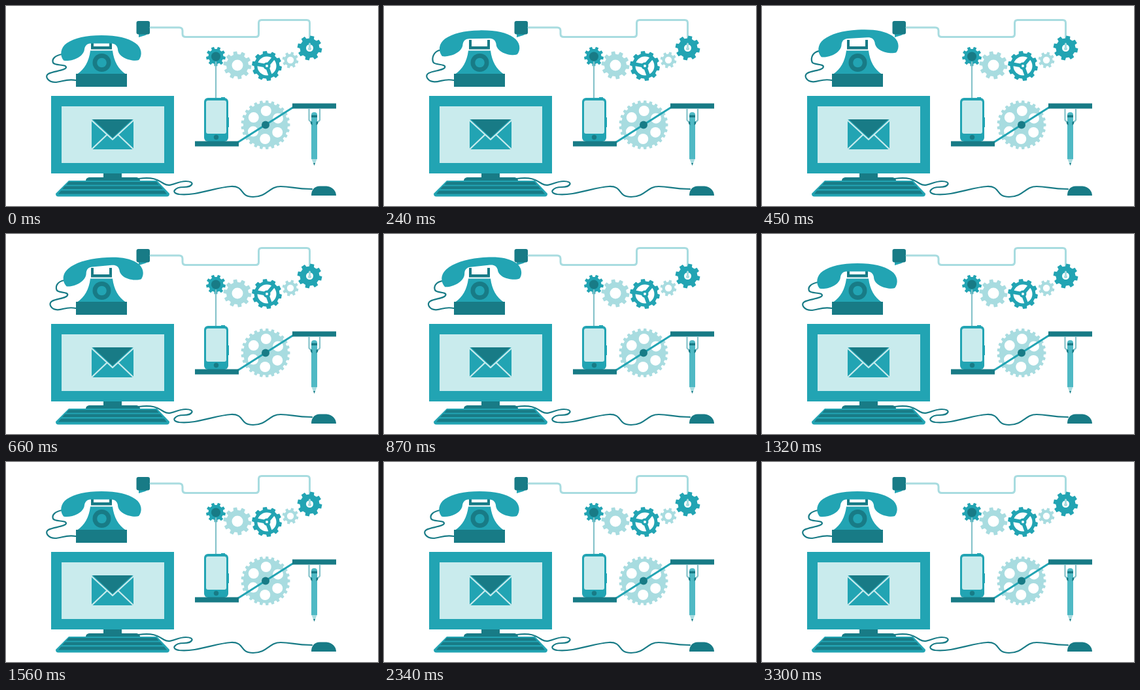
Write an HTML page that moves like this. It is 569x307 px and loops after 7200 ms.

```html
<!DOCTYPE html>
<html lang="en">
<head>
<meta charset="utf-8">
<title>Desk machine</title>
<style>
  html, body { margin: 0; width: 100%; height: 100%; overflow: hidden; background: #fff; }
  svg { display: block; width: 100%; height: 100%; }
  .mid { fill: #22a4b3; }
  .dark { fill: #187b86; }
  .pale { fill: #c9ebed; }
  .soft { fill: #a8dce0; }
  .white { fill: #fff; }
  .wood { fill: #4fb9c4; }
  .line { fill: none; stroke-width: 2.2; stroke-linecap: round; stroke-linejoin: round; }
</style>
</head>
<body>
<svg viewBox="0 0 569 307">
  <!-- wire and plug -->
  <path class="mid" d="M203 42H218L213 45L203 48Z"/>
  <rect class="dark" x="199.5" y="23" width="20.5" height="20.5" rx="3"/>
  <path class="line" stroke="#a8dce0" style="stroke-width:3" d="M221 33H265Q270 33 270 38V43Q270 47.5 275 47.5H382Q386.5 47.5 386.5 43V26Q386.5 21.5 391 21.5H460Q464.5 21.5 464.5 26V48"/>

  <!-- telephone -->
  <path class="dark" d="M130 52H134V62H158V52H162V66.5H130Z"/>
  <path class="mid" d="M129 68.5H163C165 85 172 97 183 104.5H109C120 97 127 85 129 68.5Z"/>
  <circle class="dark" cx="146.5" cy="87" r="14"/>
  <circle class="mid" cx="146.5" cy="87" r="7.3"/>
  <rect class="dark" x="107" y="104" width="78" height="20"/>
  <path id="cord" class="line" stroke="#187b86"/>
  <path id="handset" class="mid" d="M88 83.5C82 76 83 64 93 57C105 49 122 45 146 45S187 49 198 57C208 64 209 76 203 83C194 86 171 80 171 66C170 60 166 57.500 160 57.500H130C125 57.500 121 60 120 66C119 80 97 86 88 83.500Z"/>

  <!-- computer -->
  <rect class="mid" x="69" y="138" width="188" height="119"/>
  <rect class="pale" x="85" y="154" width="157" height="87"/>
  <rect class="mid" x="131" y="174" width="64" height="46" rx="2"/>
  <path class="dark" d="M133 174H193L163 202Z"/>
  <path class="line" stroke="#c9ebed" d="M131.500 176L163 205L194.500 176M132 219L154 198M194 219L172 198"/>
  <rect class="dark" x="149" y="257" width="28" height="7"/>
  <path class="dark" d="M127 263H200Q205 264 205 268H122Q122 264 127 263Z"/>
  <path class="mid" d="M96 268H231L250 288Q250 292.5 246 292.5H80Q76 292.5 76 288Z"/>
  <path class="dark" d="M96 270H230L234 274.5H92ZM90 276.5H236L240 281H86ZM84 283.5H242L246 288.5H80Z"/>
  <path class="line" stroke="#187b86" d="M203 265C226 262 232 267 242 273S260 269 275 269S286 278 272 278S251 287 265 289C290 292 322 278 344 277S356 293 378 293S402 277 420 277S440 281 468 281"/>
  <path class="dark" d="M467 291C467 283 471 276.5 480 276.5H490C499 277 505 284 505 291Z"/>

  <g id="gears"></g>
  <path class="line" stroke="#a8dce0" style="stroke-width:3" d="M464.5 58V65"/>
  <circle class="soft" cx="464.5" cy="65.5" r="2.5"/>
  <path class="line" stroke="#86c3ca" d="M321 86V141"/>

  <!-- mobile and platforms -->
  <path class="line" stroke="#22a4b3" style="stroke-width:3" d="M355 209L440 155"/>
  <circle class="dark" cx="397" cy="182.5" r="6"/>
  <path class="mid" d="M329 140H335V143H329ZM338 171H341V186H338Z"/>
  <rect class="mid" x="303" y="141" width="37" height="67" rx="6"/>
  <rect class="pale" x="306" y="145" width="31" height="51" rx="3"/>
  <circle class="dark" cx="321.5" cy="201.5" r="3.7"/>
  <rect class="dark" x="289" y="207.5" width="67" height="8"/>
  <rect class="dark" x="438" y="149.5" width="67" height="8"/>

  <!-- pencil -->
  <path class="line" stroke="#86c3ca" d="M463.5 158V175L468 180M480 158V175L475.5 180"/>
  <path class="soft" d="M467 234H476L471.5 245Z"/>
  <path class="dark" d="M470 241H473L471.5 245Z"/>
  <path class="wood" d="M467 235V167Q467 163 471.5 163T476 167V235Z"/>
  <path class="dark" d="M467 167.5H476V171H467ZM466 177L468.5 178V183L466 181ZM477 177L474.5 178V183L477 181Z"/>
</svg>

<script>
const LOOP = 7200, STEP = 30;
const $ = id => document.getElementById(id);

function add(tag, attrs) {
  const el = document.createElementNS("http://www.w3.org/2000/svg", tag);
  for (const key in attrs) el.setAttribute(key, attrs[key]);
  $("gears").append(el);
}

const rad = deg => deg * Math.PI / 180;
const polar = (cx, cy, r, deg) => [cx + r * Math.cos(rad(deg)), cy + r * Math.sin(rad(deg))];
const disc = (cx, cy, r, cls) => add("circle", { cx, cy, r, class: cls });

function gear(cx, cy, r, teeth, depth, hole, cls, turn = 0) {
  const pitch = 360 / teeth, points = [];
  for (let i = 0; i < teeth; i++) {
    for (const side of [-1, 1]) {
      const root = polar(cx, cy, r - depth, turn + (i + side * 0.3) * pitch);
      const tip = polar(cx, cy, r, turn + (i + side * 0.21) * pitch);
      points.push(...(side < 0 ? [root, tip] : [tip, root]));
    }
  }
  add("polygon", { points: points.join(" "), class: cls });
  if (hole) disc(cx, cy, hole, "white");
}

gear(321, 77.5, 15, 9, 3.5, 0, "mid", 10);
disc(321, 77.5, 7, "dark");
gear(354, 91, 21.5, 10, 4.5, 8.5, "soft", 8);
gear(399, 92, 23, 10, 3.5, 14.5, "mid", 10);
for (const deg of [190, 310, 70]) {
  const [x2, y2] = polar(399, 92, 17, deg);
  add("line", { x1: 399, y1: 92, x2, y2, stroke: "#22a4b3", "stroke-width": 5.5 });
}
disc(399, 92, 5.5, "mid");
disc(399, 92, 2, "white");
gear(435, 83, 12.5, 8, 3, 5.2, "soft", 15);
gear(464.5, 64.5, 19, 8, 4, 5.5, "mid", 12);
gear(397, 182.5, 37.5, 25, 3.5, 0, "soft");
for (let i = 0; i < 6; i++) disc(...polar(397, 182.5, 21.5, i * 60 - 88), 8, "white");

// smooth 0..1 ramp between two times
function ramp(t, from, to) {
  const u = Math.min(1, Math.max(0, (t - from) / (to - from)));
  return u * u * (3 - 2 * u);
}

function draw(now) {
  const t = Math.floor(now % LOOP / STEP) * STEP;
  const lift = ramp(t, 0, 300) - ramp(t, 870, 1080);
  const swing = lift * ramp(t, 0, 870);
  const x = 3 * swing, y = -8.5 * lift, tilt = -6.2 * swing;
  $("handset").setAttribute("transform", `translate(${x} ${y}) rotate(${tilt} 146 66)`);

  // the cord hangs from the left cup; its loop follows by part of the way
  const c = Math.cos(rad(tilt)), s = Math.sin(rad(tilt));
  const ax = 146 + x - 60 * c - 8 * s, ay = 66 + y - 60 * s + 8 * c;
  const pull = 3 * lift + 3 * swing, rise = -lift;
  const at = (px, py, share) => `${px + pull * share} ${py + rise * share} `;
  $("cord").setAttribute("d", `M${ax} ${ay}C${ax - 12} ${ay + 2} `
    + at(70, 82, 1) + at(72, 87, 1)
    + "S" + at(92, 89, 0.6) + at(92, 94, 0.4)
    + "S" + at(72, 100, 1) + at(65, 104, 1)
    + "S" + at(65, 117, 0.8) + at(75, 117, 0.7)
    + "S92 111 107 114");
}

const start = performance.now();
function tick() {
  draw(performance.now() - start);
  requestAnimationFrame(tick);
}
tick();
</script>
</body>
</html>
```
